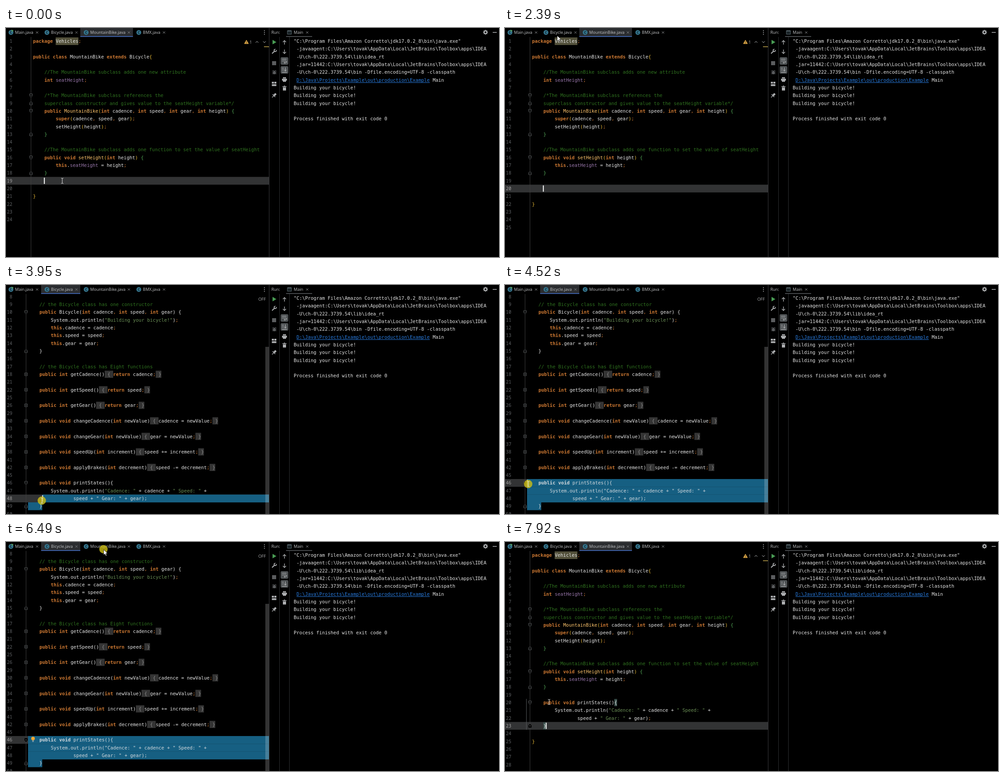
Recreate the animation shown at these times as an HTML page with a canvas. Size 1095x511 px, loop 8 s.

```html
<!DOCTYPE html>
<html lang="en">
<head>
<meta charset="utf-8">
<title>Editor</title>
<style>
html, body { margin: 0; width: 100%; height: 100%; overflow: hidden; background: #000; }
canvas { display: block; }
</style>
</head>
<body>
<canvas id="stage" width="1095" height="511"></canvas>
<script>
const g = document.getElementById('stage').getContext('2d');
const LOOP = 8000, CW = 6.3, LH = 17.32, EDGE = 584;
const MONO = '10.46px "DejaVu Sans Mono", "Noto Sans Mono", monospace';
const BOLD = 'bold ' + MONO;
const NUM = '10px "Noto Sans Mono", "DejaVu Sans Mono", monospace';
const UI = '9.1px "Open Sans", "Noto Sans", sans-serif';
const FG = '#e4e4e4', ORANGE = '#cc7832', GREY = '#afb1b3';

// ---- documents ----
const bikeHead = `package Vehicles;

public class MountainBike extends Bicycle{

    //The MountainBike subclass adds one new attribute
    int seatHeight;

    /*The MountainBike subclass references the
    superclass constructor and gives value to the seatHeight variable*/
    public MountainBike(int cadence, int speed, int gear, int height) {
        super(cadence, speed, gear);
        setHeight(height);
    }

    //The MountainBike subclass adds one function to set the value of seatHeight
    public void setHeight(int height) {
        this.seatHeight = height;
    }`.split('\n');
const states = `    public void printStates(){
        System.out.println("Cadence: " + cadence + " Speed: " +
                speed + " Gear: " + gear);
    }`.split('\n');
const bicycle = `
    // the Bicycle class has one constructor
    public Bicycle(int cadence, int speed, int gear) {
        System.out.println("Building your bicycle!");
        this.cadence = cadence;
        this.speed = speed;
        this.gear = gear;
    }

    // the Bicycle class has Eight functions
    public int getCadence() { return cadence; }

    public int getSpeed() { return speed; }

    public int getGear() { return gear; }

    public void changeCadence(int newValue) { cadence = newValue; }

    public void changeGear(int newValue) { gear = newValue; }

    public void speedUp(int increment) { speed += increment; }

    public void applyBrakes(int decrement) { speed -= decrement; }
`.split('\n').concat(states, '');
const FOLDED = / \{ (?=.*; \}$)|(?<=;) \}$/g;
const bicycleNums = [];
for (let n = 8, i = 0; i < bicycle.length; i++) {
  bicycleNums.push(n);
  n += bicycle[i].endsWith('; }') ? 3 : 1;
}
const consoleLines = String.raw`"C:\Program Files\Amazon Corretto\jdk17.0.2_8\bin\java.exe"
 -javaagent:C:\Users\tovak\AppData\Local\JetBrains\Toolbox\apps\IDEA
 -U\ch-0\222.3739.54\lib\idea_rt
 .jar=11442:C:\Users\tovak\AppData\Local\JetBrains\Toolbox\apps\IDEA
 -U\ch-0\222.3739.54\bin -Dfile.encoding=UTF-8 -classpath

Building your bicycle!
Building your bicycle!
Building your bicycle!

Process finished with exit code 0`.split('\n');

// ---- timeline ----
const SWITCH = 2530, PRESS = 3630, RELEASE = 4650, BACK = 6560, PASTE = 7920;
const path = [
  [0, 125, 341], [1245, 125, 341], [1450, 288, 8], [1690, 288, 8], [2220, 117, 18],
  [2350, 117, 18], [2390, 116, 17], [2800, 116, 17], [3020, 162, 213], [3300, 150, 385],
  [3600, 103, 497], [3660, 103, 497], [3950, 80, 481], [4430, 50, 444], [4520, 52, 444],
  [4720, 50, 446], [4950, 50, 446], [5150, 28, 440], [5450, 28, 440], [6260, 211, 15],
  [6360, 211, 15], [6420, 217, 17], [6600, 217, 17], [7160, 80, 373], [7400, 95, 360], [7550, 98, 357]
];
const within = (t, spans) => spans.some(([a, b]) => t >= a && t < b);
const caretOff = [[235, 750], [1700, 2200], [3050, 3550], [5320, 5820], [6330, BACK], [7060, 7540]];
const clicks = [[SWITCH, 2670], [PRESS, RELEASE], [6360, 6580]];

function pointerAt(t) {
  const i = path.findIndex(p => p[0] > t);
  if (i < 0) return path[path.length - 1].slice(1);
  const [a, x, y] = path[i - 1], [b, u, v] = path[i];
  let k = (t - a) / (b - a);
  if (b - a > 400) k = k * k * (3 - 2 * k);
  return [x + (u - x) * k, y + (v - y) * k];
}

// ---- drawing helpers ----
function box(x, y, w, h, c) { g.fillStyle = c; g.fillRect(x, y, w, h); }
function text(s, x, y, c = FG, font = MONO, align = 'left') {
  g.font = font; g.fillStyle = c; g.textAlign = align;
  g.fillText(s, x, y + 3.8);
}
function shape(pts, stroke, fill, w = 1, close = !!fill) {
  g.beginPath();
  for (let i = 0; i < pts.length; i += 2) g.lineTo(pts[i], pts[i + 1]);
  if (close) g.closePath();
  if (fill) { g.fillStyle = fill; g.fill(); }
  if (stroke) { g.strokeStyle = stroke; g.lineWidth = w; g.stroke(); }
}
function disc(x, y, r, fill, stroke, w = 1) {
  g.beginPath(); g.arc(x, y, r, 0, 7);
  if (fill) { g.fillStyle = fill; g.fill(); }
  if (stroke) { g.strokeStyle = stroke; g.lineWidth = w; g.stroke(); }
}
function cross(x, y) {
  shape([x - 2.5, y - 2.5, x + 2.5, y + 2.5], '#7c7e80');
  shape([x - 2.5, y + 2.5, x + 2.5, y - 2.5], '#7c7e80');
}
function at(x, y, draw) { g.save(); g.translate(x, y); draw(); g.restore(); }

function foldMark(x, y, kind, solid) {
  const c = solid ? '#000' : '#5a5d5f';
  at(x, y, () => {
    if (kind === 'plus') shape([-3, -3, 3, -3, 3, 3, -3, 3], c, '#000');
    else {
      const s = kind === 'open' ? 1 : -1;
      shape([-3, -3.5 * s, 3, -3.5 * s, 3, 1 * s, 0, 4 * s, -3, 1 * s], c, '#000');
    }
    shape([-1.6, 0, 1.6, 0], solid ? '#777' : c);
    if (kind === 'plus') shape([0, -1.6, 0, 1.6], c);
  });
}

// ---- code ----
const KEY = /^(package|public|class|extends|int|void|super|this|return)$/;
const TOKEN = /\/[\/*].*|.*\*\/$|"[^"]*"|\w+|\S/g;

function codeLine(s, x, y, rich, selected) {
  for (const m of s.matchAll(TOKEN)) {
    const w = m[0], key = KEY.test(w);
    let c = FG;
    if (/^\/[\/*]|\*\/$/.test(w)) c = '#2f721f';
    else if (w[0] === '"') c = '#6a8f55';
    else if (key || w === ';' || w === ',') c = ORANGE;
    else if (w === 'seatHeight') c = '#9876aa';
    else if (rich && /[{}]/.test(w)) c = s[0] === ' ' ? '#54a857' : '#e8ba36';
    else if (rich && /[()]/.test(w)) c = '#e8ba36';
    else if (rich && /^ +public/.test(s) && s[m.index + w.length] === '(') c = '#ffc66d';
    text(w, x + m.index * CW, y, selected ? '#d3d9dd' : c, key ? BOLD : MONO);
  }
  for (const m of s.matchAll(FOLDED)) {
    const left = x + m.index * CW;
    box(left, y - 8, m[0].length * CW, 16, '#343434');
    text(m[0].trim(), left + CW, y, '#8c8c8c');
  }
}

function lineNumber(n, y, active) { text(n, 14, y, active ? '#a4a3a3' : '#606366', NUM, 'right'); }
function caretBar(x, y) { box(x - 1, y - 7, 2, 14, '#fff'); }

function mountainPane(t) {
  const pasted = t >= PASTE, top = 29.2, x = 60;
  const body = pasted ? ['', ...states, ''] : t >= 750 ? ['', '', ''] : ['', ''];
  const lines = [...bikeHead, ...body, '}'];
  const current = pasted ? 22 : t >= 750 ? 19 : 18;
  const rowY = r => top + r * LH;
  box(0, rowY(current) - 8.7, EDGE, LH, '#323334');
  box(55, 20, 1, 491, '#3c3c3c');
  box(110.4, 21, 50.4, 17, '#52503a');
  if (pasted) {
    box(47, 350, 1, 69, '#55585a');
    box(x + 29 * CW, rowY(19) - 8, CW, 16, '#3b514d');
    box(x + 4 * CW, rowY(22) - 8, CW, 16, '#3b514d');
  }
  const marks = { 7: 'open', 8: 'close', 9: 'open', 12: 'close', 15: 'open', 17: 'close' };
  if (pasted) Object.assign(marks, { 19: 'open', 22: 'close' });
  for (const r in marks) foldMark(55.5, rowY(+r), marks[r], +r === 22);
  for (let r = 0; r < lines.length + 3; r++) {
    lineNumber(r + 1, rowY(r), r === current);
    const fresh = pasted && r > 18 && r < 23;
    if (lines[r]) codeLine(lines[r], x, rowY(r), !fresh);
  }
  if (!within(t, caretOff)) caretBar(x + (pasted ? 5 : 4) * CW, rowY(current));
  // inspection widget
  shape([534, 27, 538.5, 35, 529.5, 35], '#d9a343', '#d9a343');
  box(533.5, 29.5, 1, 3, '#222'); box(533.5, 33.4, 1, 1, '#222');
  text('1', 541, 31, GREY, UI);
  shape([554.5, 33, 557.5, 29.5, 560.5, 33], GREY);
  shape([571, 29.5, 574, 33, 577, 29.5], GREY);
  box(573, 41, 11, 1.5, '#c2a64d');
}

function bicyclePane(t) {
  const top = 26, x = 49, rowY = r => top + r * LH;
  const selecting = t >= PRESS;
  let row = 26, col = 16;
  if (selecting) {
    const [px, py] = pointerAt(Math.min(t, RELEASE));
    row = Math.min(27, Math.round((py - top) / LH));
    col = Math.min(bicycle[row].length, Math.max(0, Math.round((px - x) / CW)));
  }
  box(0, rowY(row) - 8.7, EDGE, LH, '#323334');
  box(44, 20, 1, 491, '#3c3c3c');
  if (selecting) {
    for (let r = row; r <= 27; r++) {
      const a = r === row ? x + col * CW : x, b = r === 27 ? x + 5 * CW : EDGE;
      box(a, rowY(r) - 8.7, b - a, LH + 0.2, '#165f82');
    }
  } else {
    // usages of the word under the caret: writes brown, reads green
    bicycle.forEach((s, r) => {
      const m = s.match(/\bspeed\b(?=( [-+]?= )?)/);
      if (m && r !== 2) box(x + m.index * CW, rowY(r) - 8, 5 * CW, 16, m[1] ? '#45352c' : '#34483a');
    });
    [108, 298, 487].forEach(y => box(573, y, 11, 1.3, '#2c7a45'));
    [203, 406, 433].forEach(y => box(573, y, 11, 1.3, '#b0657c'));
  }
  box(576, 138, 8, 373, 'rgba(255,255,255,.2)');
  const inGutter = t >= 4960 && t < 5500;
  bicycle.forEach((s, r) => {
    const y = rowY(r);
    lineNumber(bicycleNums[r], y, r === row);
    const kind = s.endsWith('; }') ? 'plus' : /^    public/.test(s) ? 'open' : s === '    }' ? 'close' : '';
    if (kind) foldMark(44.5, y, kind, (r === 24 && t >= 4960) || (r === 27 && inGutter));
    codeLine(s, x, y, false, selecting && r >= row);
  });
  if (!within(t, caretOff)) caretBar(x + col * CW + 0.8, rowY(row));
  if (t >= 5480) {
    disc(60, 438.5, 4, '#f0a732');
    box(58, 443, 4, 1, '#c8c8c8'); box(58.5, 445, 3, 1, '#c8c8c8');
  }
  text('OFF', 560.5, 31, GREY, UI);
}

// ---- window chrome ----
function tabs(bicycleOn) {
  const [a, w] = bicycleOn ? [78, 87] : [165, 117];
  box(0, 0, EDGE, 20, '#000');
  box(a, 0, w, 19, '#2b2d30');
  box(a, 18, w, 2, '#3b5da3');
  [['Main.java', 11, 69], ['Bicycle.java', 91, 156.5], ['MountainBike.java', 178, 273], ['BMX.java', 295, 351]]
    .forEach(([name, x, end]) => {
      disc(x, 10, 5.4, '#35748c');
      text('C', x, 9.6, '#0d2630', 'bold 8px "Open Sans", sans-serif', 'center');
      text(name, x + 9, 9.6, '#c4c6c8', UI);
      cross(end, 10);
    });
  shape([12.5, 3.5, 17, 6, 12.5, 8.5], null, '#59a869');
  [6, 10, 14].forEach(y => disc(574, y, 1, GREY));
}

function runPanel() {
  box(EDGE, 0, 511, 511, '#000');
  box(EDGE, 0, 1, 511, '#393b3d');
  box(607, 20, 1, 491, '#2d2f31');
  box(629, 20, 1, 491, '#2d2f31');
  box(622, 18, 58, 2, '#45484b');
  text('Run:', 589.5, 9.6, '#c4c6c8', UI);
  text('Main', 639, 9.6, '#c4c6c8', UI);
  cross(669, 10);
  shape([625, 6, 634, 6, 634, 14, 625, 14], '#59666c', '#182226');
  box(625, 5.5, 9, 2, '#59666c');
  // gear and minimise
  disc(1065, 9.5, 3, null, GREY, 2.2);
  for (let i = 0; i < 8; i++) at(1065, 9.5, () => { g.rotate(i * Math.PI / 4); box(-1, -5.2, 2, 2, GREY); });
  box(1081, 9, 9, 1.5, GREY);
  // left tool column
  shape([592, 26.5, 600.5, 31.5, 592, 36.5], null, '#499c54');
  shape([591, 57, 597, 51], GREY, null, 2.2);
  g.beginPath(); g.arc(598, 50, 2.6, -0.3, 4.9); g.strokeStyle = GREY; g.lineWidth = 1.8; g.stroke();
  box(591, 74, 9, 9, '#5b5d5f');
  disc(596, 100, 3.2, '#5b5d5f');
  [-3, 0, 3].forEach(d => shape([591, 99 + d, 601, 99 + d], '#5b5d5f'));
  shape([593, 94, 596, 97, 599, 94], '#5b5d5f');
  box(590.5, 120, 4.5, 4, GREY); box(596, 120, 4.5, 4, GREY); box(590.5, 125.5, 10, 4, GREY);
  shape([591, 155, 595, 151], GREY, null, 1.3);
  shape([592, 148, 598, 154], GREY, null, 1.6);
  shape([594, 149, 598, 145, 601, 148, 597, 152], null, GREY);
  // right tool column
  shape([618.5, 37, 618.5, 28], GREY, null, 1.4);
  shape([615, 31.5, 618.5, 28, 622, 31.5], GREY, null, 1.4);
  shape([618.5, 48, 618.5, 57], GREY, null, 1.4);
  shape([615, 53.5, 618.5, 57, 622, 53.5], GREY, null, 1.4);
  [73.5, 93.5].forEach(y => {
    g.beginPath(); g.roundRect(610, y - 8.5, 17, 17, 3);
    g.fillStyle = '#4c5052'; g.fill();
  });
  box(613, 69, 10, 1.2, GREY);
  shape([613, 73.5, 622, 73.5, 623.5, 75.5, 622, 77.5, 618, 77.5], GREY, null, 1.2);
  shape([620, 75.3, 617.5, 77.5, 620, 79.7], GREY);
  box(613, 98, 11, 1.3, GREY); box(613, 89, 4, 1.2, GREY); box(613, 93, 4, 1.2, GREY);
  shape([620.5, 88, 620.5, 96], GREY, null, 1.2);
  shape([618, 93.5, 620.5, 96, 623, 93.5], GREY, null, 1.2);
  box(615, 110, 7, 2.5, GREY); box(613, 113.3, 11, 4, GREY); box(615, 116.5, 7, 3.5, GREY);
  box(614, 130, 9, 1.5, GREY); box(617, 128.8, 3, 1.5, GREY); box(615, 132.5, 7, 7, GREY);
  // output
  consoleLines.forEach((s, i) => text(s, 639, 29.2 + i * LH));
  const y = 29.2 + 5 * LH, link = 'D:\\Java\\Projects\\Example\\out\\production\\Example';
  text(link, 639 + CW, y, '#287bde');
  box(639 + CW, y + 5.5, link.length * CW, 1, '#287bde');
  text('Main', 639 + (link.length + 2) * CW, y);
}

function pointer(t, bicycleOn) {
  const [x, y] = pointerAt(t), pressed = within(t, clicks);
  const drag = t >= PRESS && t < RELEASE;
  const arrow = !drag && (y < 20 || (bicycleOn && x < 49));
  if (pressed) disc(x - 0.5, arrow ? y - 1 : y, 9.3, 'rgba(205,190,20,.8)');
  at(x, y, () => {
    if (arrow) shape([0, 0, 0, 12, 2.8, 9.5, 4.8, 14, 6.8, 13, 4.8, 8.8, 8.6, 8.6], '#000', '#fff', 0.7);
    else {
      shape([0, -5.5, 0, 5.5], '#e8e8e8');
      shape([-2.5, -6, -0.5, -5.5, 0.5, -5.5, 2.5, -6], '#e8e8e8');
      shape([-2.5, 6, -0.5, 5.5, 0.5, 5.5, 2.5, 6], '#e8e8e8');
    }
  });
}

function frame(now) {
  const t = now % LOOP, bicycleOn = t >= SWITCH && t < BACK;
  box(0, 0, 1095, 511, '#000');
  (bicycleOn ? bicyclePane : mountainPane)(t);
  tabs(bicycleOn);
  runPanel();
  pointer(t, bicycleOn);
}

const start = performance.now();
(function tick() {
  frame(performance.now() - start);
  requestAnimationFrame(tick);
})();
</script>
</body>
</html>
```
